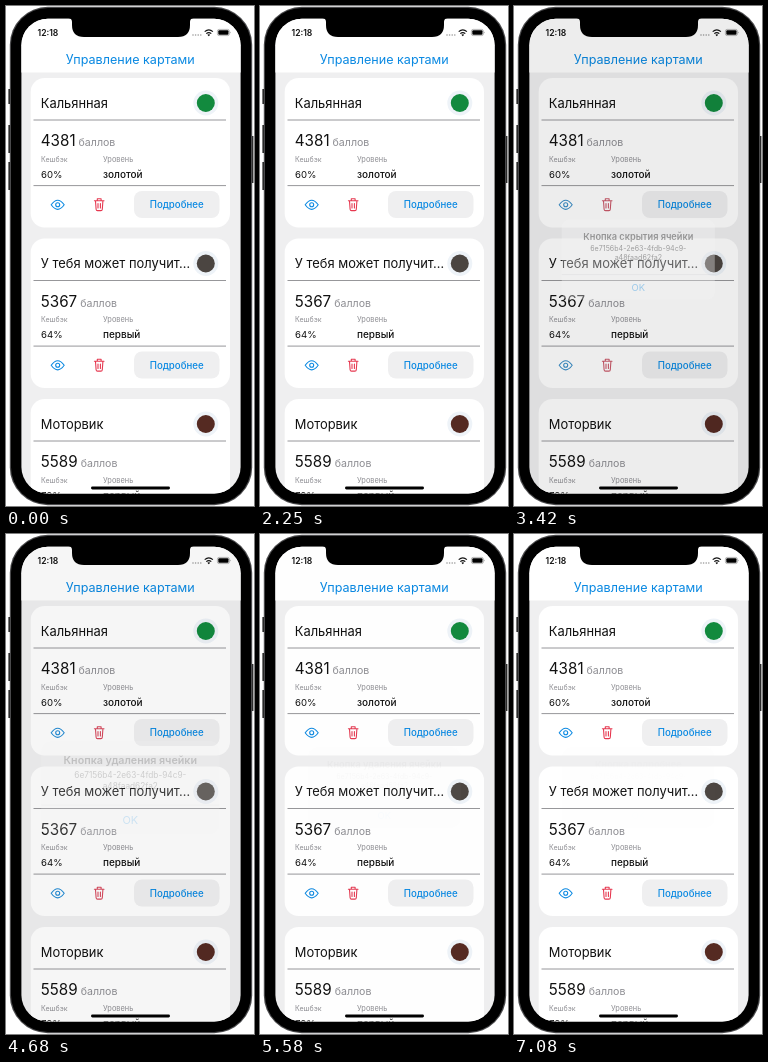
Recreate the animation shown at these times as an HTML page. Size 248x500 px, loop 7110 ms.

```html
<!DOCTYPE html>
<html lang="ru">
<head>
<meta charset="utf-8">
<title>Управление картами</title>
<style>
  html, body { margin: 0; width: 100%; height: 100%; overflow: hidden; background: #fff; }
  svg { display: block; width: 248px; height: 500px; }
  text { font-family: Inter, Roboto, "Open Sans", sans-serif; fill: #111; white-space: pre; }
  .mid { text-anchor: middle; }
  .blue { fill: #0a89e2; }
  .note { fill: #8e8e93; }
  .icon { fill: none; stroke-width: 1.1; stroke-linecap: round; stroke-linejoin: round; }
</style>
</head>
<body>
<svg viewBox="0 0 248 500">
  <defs>
    <clipPath id="glass"><rect x="15.400" y="12.700" width="219.200" height="474.700" rx="26.500"/></clipPath>
  </defs>

  <g id="body">
    <path d="M3.200 83v15M3.200 119v28M3.200 156v28M246.600 130v47" stroke="#222" stroke-width="1.6"/>
    <rect x="3.800" y=".8" width="242.400" height="498.400" rx="38" fill="#4a4a4c"/>
    <rect x="5" y="2" width="240" height="496" rx="36.800" fill="#000"/>
  </g>

  <g clip-path="url(#glass)">
    <rect x="15" y="12" width="220" height="476" fill="#efeff0"/>
    <g id="cards"></g>
    <rect x="15" y="12" width="220" height="54.500" fill="#fff"/>
    <text class="mid blue" x="124.300" y="58" font-size="12.600">Управление картами</text>

    <g id="status" transform="translate(.5 0)">
      <text x="31" y="30" font-size="8.6" font-weight="600">12:18</text>
      <g fill="#999">
        <circle cx="186.5" cy="29" r=".8"/><circle cx="189.1" cy="29" r=".8"/>
        <circle cx="191.7" cy="29" r=".8"/><circle cx="194.3" cy="29" r=".8"/>
      </g>
      <path d="M198.2 25.6Q202.3 22.2 206.4 25.6M199.8 27.6Q202.3 25.5 204.8 27.6" fill="none" stroke="#111" stroke-width="1.2"/>
      <path d="M200.9 28.8Q202.3 27.8 203.7 28.8L202.3 30.3Z"/>
      <rect x="210.9" y="23.4" width="12" height="6.2" rx="1.8" fill="none" stroke="#888" stroke-width=".6"/>
      <rect x="211.8" y="24.3" width="10.2" height="4.4" rx="1"/>
      <path d="M223.7 25.5Q225 26.5 223.7 27.5Z" fill="#888"/>
    </g>

    <rect x="85" y="480.500" width="79" height="2.900" rx="1.450"/>
    <rect id="dim" x="15" y="12" width="220" height="476"/>
    <g id="alert"></g>
  </g>
  <path d="M62.500 12Q66 12.700 66 16V19Q66 31 78 31H172Q184 31 184 19V16Q184 12.700 187.500 12Z"/>
</svg>

<script>
const LOOP = 7110, SPRING = 22.85, SETTLE = 404;
const BLUE = [10, 137, 226], RED = [230, 56, 80], GRAY = [150, 150, 150];
const CX = 124.3, CY = 253.6, WIDTH = 153;
const ID = ["6e7156b4-2e63-4fdb-94c9-", "a48faad62fa2"];

const cards = [
  { name: "Кальянная", points: 4381, back: "60%", level: "золотой", mark: "#128a3e" },
  { name: "У тебя может получит…", points: 5367, back: "64%", level: "первый", mark: "#4b4541" },
  { name: "Моторвик", points: 5589, back: "70%", level: "первый", mark: "#552a22" }
];

const alerts = [
  { open: 1018, close: 1870, title: "Кнопка управления", lines: [] },
  { open: 2608, close: 3325, title: "Кнопка скрытия ячейки", lines: ID },
  { open: 4648, close: 5325, title: "Кнопка удаления ячейки", lines: ID },
  { open: 6028, close: 6745, title: "Кнопка подробнее", lines: ID }
];

const $ = id => document.getElementById(id);

function text(x, y, size, str, attrs = "") {
  return `<text x="${x}" y="${y}" font-size="${size}" ${attrs}>${str}</text>`;
}

function cardMarkup(c, i) {
  const rule = y => `<path d="M27.500 ${y}H220" stroke="#8c8c8f" stroke-width=".9"/>`;
  return `<g transform="translate(0 ${i * 160.5})">
    <rect x="24.700" y="72" width="199.300" height="149.500" rx="14" fill="#fff"/>
    ${text(34.8, 101.5, 12.9, c.name)}
    <circle cx="199.800" cy="97" r="12.500" fill="#eef3f8"/>
    <circle cx="199.800" cy="97" r="9" fill="${c.mark}"/>
    ${rule(114)}
    <text x="34.800" y="140" font-size="15.200">${c.points}<tspan class="note" dx="3" font-size="10.600">баллов</tspan></text>
    ${text(35, 155.5, 7.1, "Кешбэк", 'class="note"')}
    ${text(97, 155.5, 7.4, "Уровень", 'class="note"')}
    ${text(35, 171.7, 9.6, c.back)}
    ${text(97, 171.7, 10, c.level, 'font-weight="500"')}
    ${rule(179.6)}
    <g class="icon eye">
      <path d="M45.200 198.800Q51.700 189.600 58.200 198.800Q51.700 208 45.200 198.800Z"/>
      <circle cx="51.700" cy="198.800" r="2"/>
    </g>
    <g class="icon bin">
      <path d="M88.400 194.800H98M91.300 194.600V192.800H95.100V194.600M89.500 195L90.100 203.200Q90.200 204.600 91.500 204.600H94.900Q96.200 204.600 96.300 203.200L96.900 195M92 197.600V202M94.400 197.600V202"/>
    </g>
    <rect x="128" y="185" width="85.500" height="27" rx="8" fill="#efeff0"/>
    ${text(170.7, 202.4, 9.7, "Подробнее", 'class="mid blue" font-weight="500"')}
  </g>`;
}

function alertMarkup(a) {
  const height = a.lines.length ? 80 : 60, top = CY - height / 2, left = CX - WIDTH / 2;
  const split = top + height - 25;
  const lines = a.lines.map((s, i) => text(CX, top + 31.4 + i * 9.4, 7.1, s, 'class="mid"'));
  return `<rect x="${left}" y="${top}" width="${WIDTH}" height="${height}" rx="8" fill="#f4f4f5"/>
    ${text(CX, top + 20, 9.2, a.title, 'class="mid" font-weight="600"')}
    ${lines.join("")}
    <path d="M${left} ${split}h${WIDTH}" stroke="#c8c8cb" stroke-width=".6"/>
    ${text(CX, split + 15.9, 9.4, "OK", 'class="mid blue"')}`;
}

// Critically damped spring from 0 to 1
function spring(ms) {
  if (ms <= 0) return 0;
  if (ms >= SETTLE) return 1;
  const k = SPRING * ms / 1000;
  return 1 - (1 + k) * Math.exp(-k);
}

const mix = (a, b, p) => `rgb(${a.map((v, i) => Math.round(v + (b[i] - v) * p))})`;

$("cards").innerHTML = cards.map(cardMarkup).join("");
const eyes = document.querySelectorAll(".eye"), bins = document.querySelectorAll(".bin");
let shown = null;

function draw(t) {
  const a = alerts.find(a => t >= a.open && t < a.close + SETTLE);
  const rise = a ? spring(t - a.open) : 0;
  const alpha = a ? rise * (1 - spring(t - a.close)) : 0;
  if (a && a !== shown) {
    $("alert").innerHTML = alertMarkup(a);
    shown = a;
  }
  const scale = 1.2 - 0.2 * rise;
  $("alert").setAttribute("transform", `translate(${CX} ${CY}) scale(${scale}) translate(${-CX} ${-CY})`);
  $("alert").setAttribute("opacity", alpha);
  $("dim").setAttribute("opacity", 0.2 * alpha);
  eyes.forEach(e => e.setAttribute("stroke", mix(BLUE, GRAY, alpha)));
  bins.forEach(e => e.setAttribute("stroke", mix(RED, GRAY, alpha)));
}

const begin = performance.now();
function frame() {
  draw((performance.now() - begin) % LOOP);
  requestAnimationFrame(frame);
}
frame();
</script>
</body>
</html>
```
